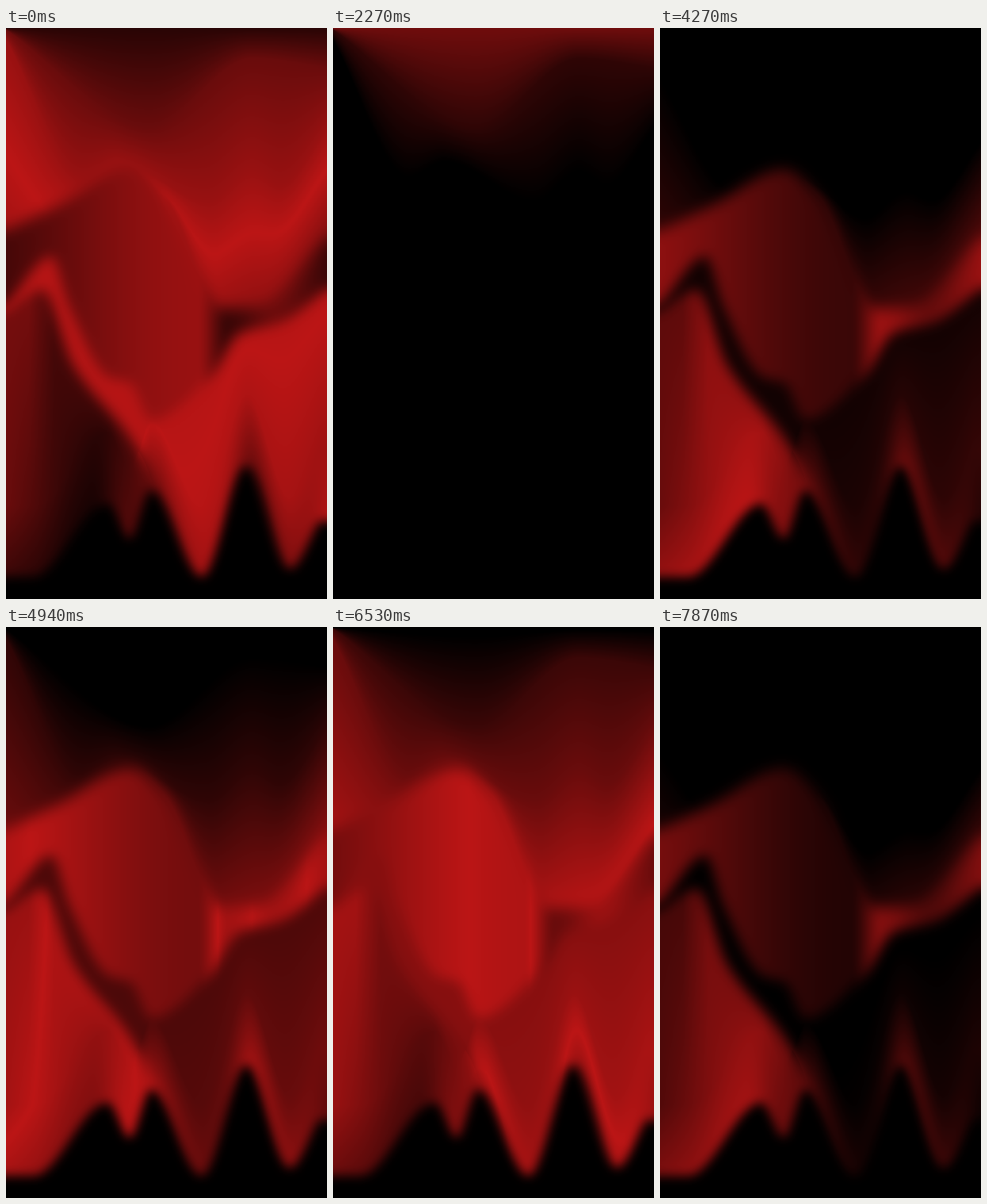
These frames come from a looping animation (405 px wide and 720 px high, 8 s). An HTML page with a canvas:

```html
<!DOCTYPE html>
<html>
<head>
<meta charset="utf-8">
<title>Red waves</title>
<style>
html, body { margin: 0; width: 100%; height: 100%; overflow: hidden; background: #000; }
canvas { display: block; width: 100vw; height: 100vh; }
</style>
</head>
<body>
<canvas id="view" width="405" height="720"></canvas>
<script>
const W = 405, H = 720, PAD = 40;
const LOOP = 8000, CYCLE = 50, REACH = 16;

const clamp = v => Math.min(1, Math.max(0, v));

// Smooth monotone curve through x, y pairs, flat beyond its ends.
function curve(...pts) {
  const n = pts.length / 2;
  const X = i => pts[2 * i], Y = i => pts[2 * i + 1];
  const rise = i => (Y(i + 1) - Y(i)) / (X(i + 1) - X(i));
  const tangent = i => {
    if (i === 0 || i === n - 1) return rise(i ? i - 1 : 0);
    const a = rise(i - 1), b = rise(i);
    return a * b > 0 ? 2 * a * b / (a + b) : 0;
  };
  return x => {
    if (x <= X(0)) return Y(0);
    if (x >= X(n - 1)) return Y(n - 1);
    let i = 0;
    while (x > X(i + 1)) i++;
    const w = X(i + 1) - X(i), t = (x - X(i)) / w, s = 1 - t;
    return s * s * (1 + 2 * t) * Y(i) + t * t * (3 - 2 * t) * Y(i + 1)
      + w * t * s * (s * tangent(i) - t * tangent(i + 1));
  };
}
const flat = v => () => v;

const haze = curve(0, 2, 180, 125, 310, 38, 405, 50);
const dusk = curve(0, 15, 95, 187, 140, 168, 255, 218, 310, 180, 345, 197, 405, 125);
const hill = curve(0, 256, 70, 222, 157, 178, 200, 212, 270, 354, 320, 352, 405, 265);
const ridge = curve(0, 350, 58, 288, 80, 350, 130, 440, 158, 448, 183, 494,
  258, 438, 295, 385, 345, 372, 405, 328);
const slope = curve(0, 357, 45, 330, 85, 425, 160, 522, 186, 580, 196, 740);
const ground = curve(0, 692, 35, 692, 128, 600, 156, 644, 183, 583, 247, 692,
  303, 552, 358, 682, 395, 622);
const drips = x => ground(x) - 90;

// Each layer fills everything below its first contour. A contour pairs a
// height with the phase at which the glow peaks there.
const layers = [
  { contours: [[flat(0), flat(62.5)], [haze, flat(57)], [dusk, flat(53)],
    [hill, curve(0, 48, 157, 53, 225, 48, 405, 45)]] },
  { blur: 9, contours: [[hill, curve(0, 40, 240, 47, 280, 39, 340, 43, 405, 39)]] },
  { blur: 8, contours: [[ridge, flat(50.5)], [drips, curve(183, 50.5, 405, 47.5)],
    [ground, curve(195, 44, 265, 48, 318, 42.5, 358, 44.5, 405, 49)]] },
  { blur: 8, contours: [[slope, curve(28, 44, 60, 40)], [drips, curve(0, 43, 110, 37.5, 185, 43)],
    [ground, curve(0, 39, 105, 36, 150, 41)]] }
];

function makeMask(edge, blur) {
  const c = document.createElement('canvas');
  c.width = W + 2 * PAD;
  c.height = H + 2 * PAD;
  const g = c.getContext('2d');
  g.filter = `blur(${blur}px)`;
  g.translate(PAD, PAD);
  g.beginPath();
  g.moveTo(-PAD, H + PAD);
  for (let x = -PAD; x <= W + PAD; x++) g.lineTo(x, edge(x));
  g.lineTo(W + PAD, H + PAD);
  g.fill();
  const { data } = g.getImageData(PAD, PAD, W, H);
  return Float32Array.from({ length: W * H }, (_, i) => data[i * 4 + 3] / 255);
}

function makePhases(contours) {
  const field = new Float32Array(W * H);
  for (let x = 0; x < W; x++) {
    const stops = contours.map(([height, phase]) => [height(x), phase(x)]);
    for (let y = 0; y < H; y++) {
      let p = stops[0][1];
      for (let k = 1; k < stops.length; k++) {
        const top = stops[k - 1][0], [bottom, next] = stops[k];
        p += (next - p) * clamp((y - top) / Math.max(1, bottom - top));
      }
      field[y * W + x] = p;
    }
  }
  return field;
}

for (const layer of layers) {
  layer.phases = makePhases(layer.contours);
  layer.mask = layer.blur && makeMask(layer.contours[0][0], layer.blur);
}
const shade = makeMask(ground, 6.5);

const ctx = document.getElementById('view').getContext('2d');
const picture = ctx.createImageData(W, H);
const light = new Float32Array(W * H);

function glow(step, phase) {
  const gap = (step - phase + 2.5 * CYCLE) % CYCLE - CYCLE / 2;
  return clamp(1 - Math.abs(gap) / REACH);
}

function paint(step) {
  for (const { mask, phases } of layers) {
    for (let i = 0; i < light.length; i++) {
      const a = mask ? mask[i] : 1;
      if (a) light[i] += a * (glow(step, phases[i]) - light[i]);
    }
  }
  const px = picture.data;
  for (let i = 0, p = 0; i < light.length; i++, p += 4) {
    const v = light[i] * (1 - shade[i]);
    px[p] = 187 * v;
    px[p + 1] = px[p + 2] = 21 * v;
    px[p + 3] = 255;
  }
  ctx.putImageData(picture, 0, 0);
}

// Steps of 120 ms shown on a 15 Hz clock, forward and then back.
function stepAt(ms) {
  const tick = Math.floor(ms * 0.015 + 0.01);
  const k = Math.floor((tick + 1.3) / 1.8);
  return k > CYCLE ? 2 * CYCLE - k : k;
}

let shown = -1;
function frame() {
  const step = stepAt(performance.now() % LOOP);
  if (step !== shown) paint(shown = step);
  requestAnimationFrame(frame);
}
frame();
</script>
</body>
</html>
```
